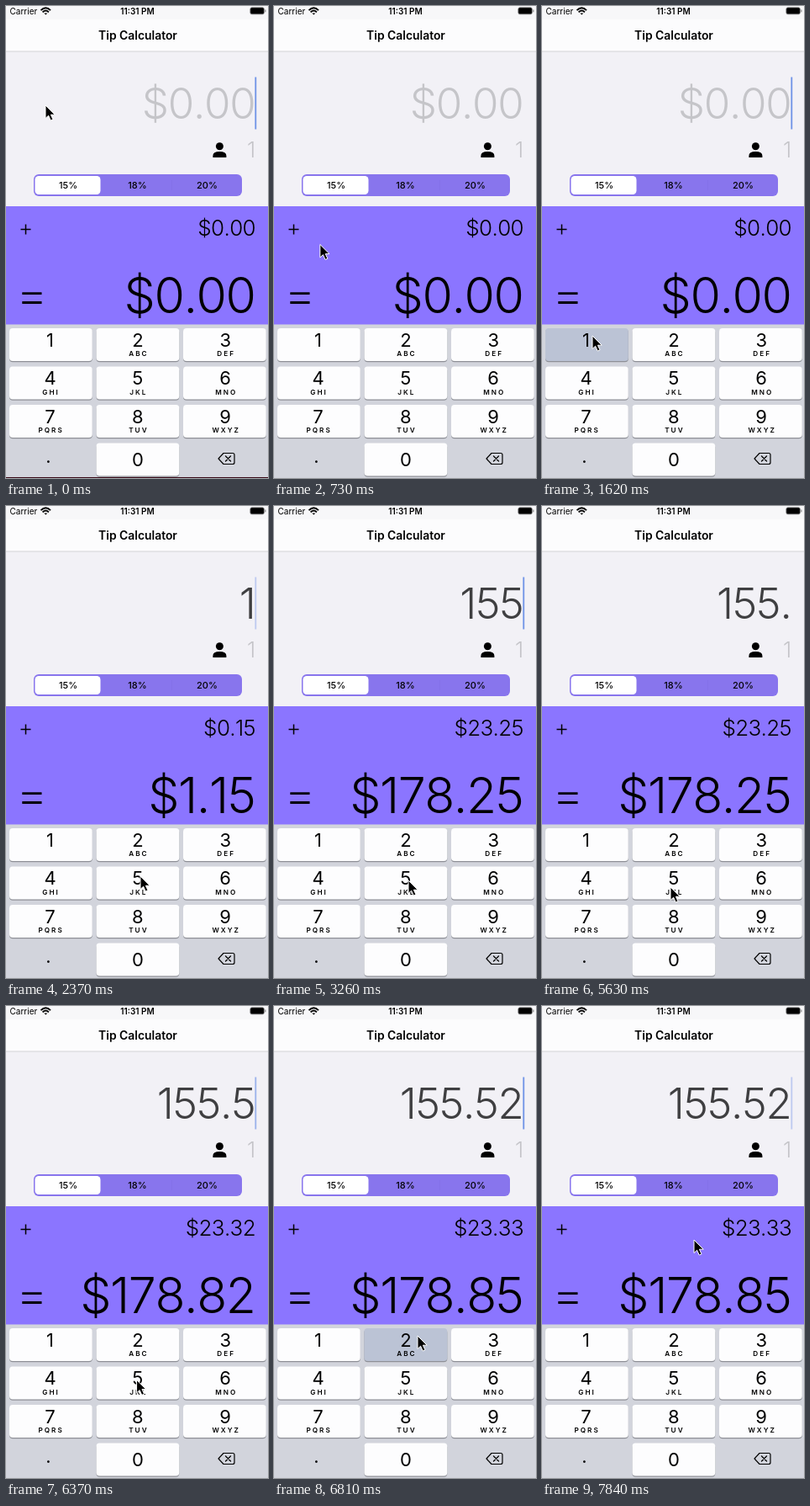
Write an HTML page that moves like this. It is 312 px wide and 561 px high and loops after 7990 ms.

```html
<!DOCTYPE html>
<html lang="en">
<head>
<meta charset="utf-8">
<title>Tip Calculator</title>
<style>
html, body { margin: 0; width: 100%; height: 100%; overflow: hidden; background: #f2f1f6; }
svg { display: block; width: 312px; height: 561px; font-family: Inter, Roboto, sans-serif; }
.mid { text-anchor: middle; }
.end { text-anchor: end; font-weight: 300; letter-spacing: -.025em; font-kerning: none; }
.seg { font-size: 11px; font-weight: 500; }
.digit { font-size: 22px; }
.abc { font-size: 8.2px; font-weight: 600; letter-spacing: 2px; }
</style>
</head>
<body>
<svg viewBox="0 0 312 561">
  <rect width="312" height="54" fill="#fcfcfd"/>
  <rect width="312" height="16" fill="#f7f7f9"/>
  <rect y="53.5" width="312" height="1" fill="#d3d3d7"/>
  <g font-size="10">
    <text x="4.5" y="10">Carrier</text>
    <text class="mid" x="156.5" y="10" font-weight="600">11:31 PM</text>
  </g>
  <g fill="none" stroke="#000" stroke-width="1.9">
    <path d="M41.5 5.2Q47.3-.6 53 5.2M43.6 7.4Q47.3 3.8 50.9 7.4"/>
    <path d="M45.3 8.4h4l-2 2.2z" fill="#000" stroke="none"/>
  </g>
  <rect x="290.8" y="1.8" width="16.6" height="8" rx="2" fill="#000" stroke="#8b8b8d" stroke-width=".8"/>
  <rect x="308.3" y="4.2" width="1.2" height="3.2" rx=".6" fill="#8b8b8d"/>
  <text class="mid" x="157" y="40.3" font-size="13.9" font-weight="600">Tip Calculator</text>

  <text id="bill" class="end" x="296.5" y="133.5" font-size="51"></text>
  <rect id="caret" x="296.4" y="84.5" width="1.8" height="62" fill="#6e92e6"/>
  <circle cx="254.4" cy="166.7" r="4.5"/>
  <path d="M246.4 180v-2q0-5 8-5t8 5v2z"/>
  <text class="end" x="296.5" y="180" font-size="26" fill="#c5c5c9">1</text>

  <rect x="33" y="200" width="248" height="26" rx="6" fill="#8875ed"/>
  <rect x="34.5" y="202" width="78" height="22" rx="4.5" fill="#fff"/>
  <rect x="197" y="207" width="1" height="12" fill="#8471e8"/>
  <g class="mid seg">
    <text x="74" y="217">15%</text><text x="156.5" y="217">18%</text><text x="239.5" y="217">20%</text>
  </g>

  <rect y="238" width="312" height="141" fill="#8b75ff"/>
  <path d="M17.5 265.5h12M23.5 259.5v12" stroke="#000" stroke-width="1.5"/>
  <path d="M19.3 341.7h23.2M19.3 352.5h23.2" stroke="#000" stroke-width="2.8"/>
  <text id="tip" class="end" x="297" y="272.5" font-size="26"></text>
  <text id="total" class="end" x="296.5" y="364.7" font-size="59"></text>

  <rect y="378.5" width="312" height="183" fill="#d2d4dc"/>
  <g id="keys"></g>
  <text class="mid digit" x="50.5" y="543">.</text>
  <g fill="none" stroke="#000" stroke-width="1.2" stroke-linejoin="round" stroke-linecap="round">
    <path d="M259 531.5h11q2 0 2 2v9q0 2-2 2h-11l-6-6.5z"/>
    <path d="M261.5 535l6 6m0-6l-6 6"/>
  </g>
  <rect id="edge" y="560" width="312" height="1" fill="#3a0a18"/>
  <path id="pointer" d="M0 0V15.5L3.6 12.2L6.2 18L9 16.8L6.4 11.2H11.2Z" stroke="#fff" stroke-width="1" stroke-linejoin="round"/>
</svg>
<script>
const LOOP = 7990;
const $ = id => document.getElementById(id);

// time, x, y of the pointer tip
const path = [
  [150, 47, 118], [1170, 60, 392], [1850, 60, 392], [2300, 160, 438], [2500, 160, 445],
  [3270, 160, 445], [3400, 160, 474], [3550, 160, 489], [4200, 160, 489], [4600, 66, 533],
  [4950, 66, 533], [5330, 150, 458], [5630, 153, 453], [6300, 153, 453], [6600, 171, 392],
  [7250, 171, 392], [7400, 174, 381], [7840, 181, 278]
];
// key, pressed from, pressed until, typed at
const presses = [
  ['1', 1470, 1750, 1750], ['5', 2510, 2660, 2640], ['5', 2950, 3100, 3080],
  ['.', 4740, 4880, 4880], ['5', 5770, 5910, 5900], ['2', 6650, 6950, 6780]
];
const blinks = [[600, 1020], [2300, 2620], [3740, 4300], [5440, 5880], [6330, 6700], [7770, 8200]];

const letters = ['', 'ABC', 'DEF', 'GHI', 'JKL', 'MNO', 'PQRS', 'TUV', 'WXYZ'];
const drawKey = (n, col, row, abc) => {
  const x = 4 + col * 103.5, y = 383 + row * 45.5, mid = 52.6 + col * 104.3;
  return `<rect x="${x}" y="${y + 1}" width="98.8" height="39.2" rx="4" fill="#8e9097"/>
    <rect id="key${n}" x="${x}" y="${y}" width="98.8" height="39" rx="4"/>
    <text class="mid digit" x="${mid}" y="${y + (n ? 21.5 : 27)}">${n}</text>
    <text class="mid abc" x="${mid + 1}" y="${y + 33}">${abc}</text>`;
};
$('keys').innerHTML = letters.map((abc, i) => drawKey(i + 1, i % 3, i / 3 | 0, abc)).join('') + drawKey(0, 1, 3, '');

const clamp = v => Math.max(0, Math.min(1, v));
const ease = p => p * p * (3 - 2 * p);

function pointerAt(t) {
  const i = path.findIndex(p => p[0] > t);
  if (i < 1) return path[i ? path.length - 1 : 0].slice(1);
  const [a, b] = [path[i - 1], path[i]];
  const p = ease((t - a[0]) / (b[0] - a[0]));
  return [a[1] + (b[1] - a[1]) * p, a[2] + (b[2] - a[2]) * p];
}

const caretAt = t => blinks.reduce((a, [from, to]) =>
  Math.min(a, Math.max(clamp(1 - (t - from) / 120), clamp((t - to) / 120 + 1))), 1);

// Half-even rounding, as in the currency display
function money(cents) {
  const low = Math.floor(cents + 1e-6), rest = cents - low;
  const up = Math.abs(rest - .5) < 1e-6 ? low % 2 : rest > .5;
  return '$' + ((low + +up) / 100).toFixed(2);
}

function draw(now) {
  const t = now % LOOP;
  const typed = presses.filter(p => t >= p[3]).map(p => p[0]).join('');
  const cents = Math.round(typed * 100);
  $('bill').textContent = typed || '$0.00';
  $('bill').setAttribute('fill', typed ? '#3f3f41' : '#c5c5c9');
  $('tip').textContent = money(cents * .15);
  $('total').textContent = money(cents * 1.15);
  $('caret').setAttribute('opacity', caretAt(t));
  $('edge').setAttribute('opacity', t < 150 ? 1 : 0);
  for (let n = 0; n < 10; n++) {
    const down = presses.some(p => p[0] === String(n) && t >= p[1] && t < p[2]);
    $('key' + n).setAttribute('fill', down ? '#bbc3d5' : '#fdfdfe');
  }
  $('pointer').setAttribute('transform', `translate(${pointerAt(t)})`);
  requestAnimationFrame(draw);
}
draw(0);
</script>
</body>
</html>
```
